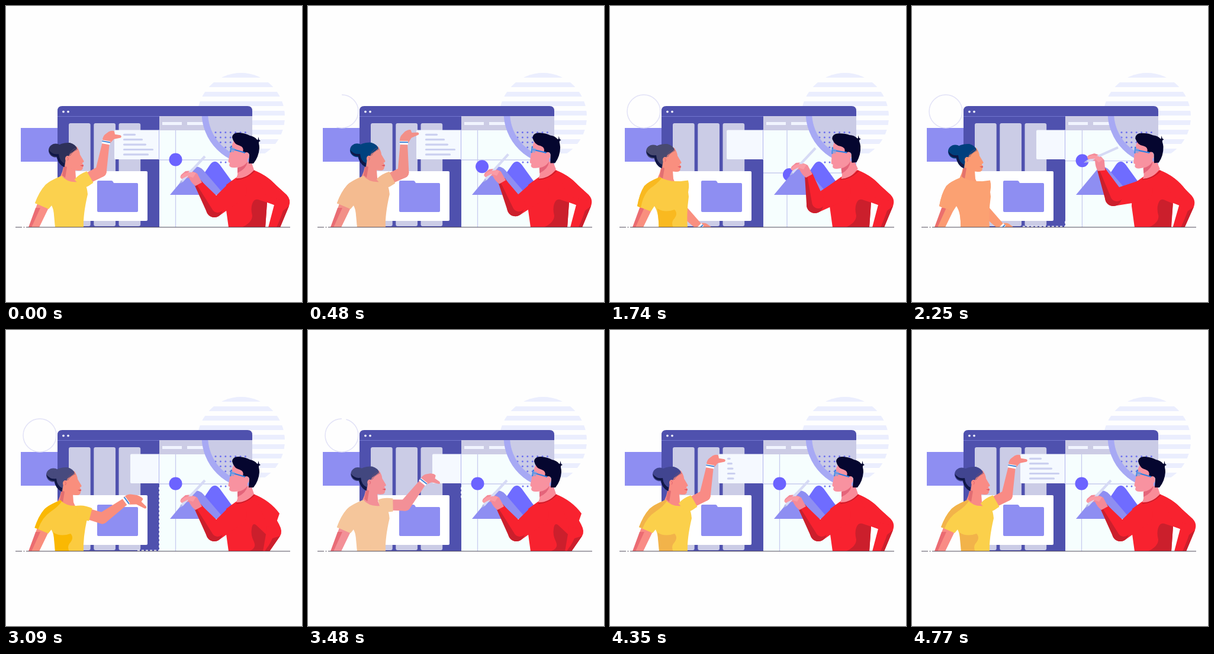
These frames come from a looping animation (500 px wide and 500 px high, 4.92 s). An HTML page:

```html
<!DOCTYPE html>
<html lang="en">
<head>
<meta charset="utf-8">
<title>Interface workshop</title>
<style>
html, body { margin: 0; width: 100%; height: 100%; overflow: hidden; background: #fefefe; }
svg { display: block; width: 100vw; height: 100vh; }
</style>
</head>
<body>
<svg viewBox="0 0 500 500">
  <defs>
    <clipPath id="disc"><circle cx="397" cy="187" r="74"/></clipPath>
    <clipPath id="page"><rect x="259" y="186" width="157" height="188"/></clipPath>
    <clipPath id="floor"><rect width="500" height="374"/></clipPath>
    <g id="arm">
      <path id="upper"/><path id="fore"/>
      <path id="hand" d="M-5 -4 Q-2 -11 3 -13 L11 -15 Q18 -15 20 -12 L19 -7 L27 -2 Q29 1 26 2 L14 0 L6 4 Q0 6 -5 -4Z"/>
      <path id="sleeve"/>
      <g id="band"><path d="M0 -7 V7" stroke="#fff" stroke-width="6"/><path d="M1 -7 V7" stroke="#3d86d8" stroke-width="2"/></g>
    </g>
  </defs>

  <g id="stripes" clip-path="url(#disc)" fill="#ebeefe"></g>
  <path fill="#8e8ef2" d="M25 206H100V263H25Z"/>
  <circle id="hoop" cx="57" cy="178" r="28" pathLength="100" transform="rotate(-90 57 178)" fill="none" stroke="#e2e2f7" stroke-width="1.5"/>

  <path fill="#4f51ae" d="M87 374V177Q87 169 95 169H408Q416 169 416 177V374Z"/>
  <path stroke="#7275cf" d="M87 186.5H416"/>
  <circle cx="97" cy="178.600" r="1.900" fill="#f4f5ff"/><circle cx="105" cy="178.600" r="1.900" fill="#f4f5ff"/>
  <g id="columns" fill="#cbcce6"></g>
  <rect x="97" y="279" width="142" height="84" rx="2" fill="#fff"/>
  <path fill="#8e8ef2" d="M154 297Q154 295 156 295H178Q180 295 181 297L182 299H221Q223 299 223 301V346Q223 348 221 348H156Q154 348 154 346Z"/>
  <path id="card" fill="#f5f9ff"/>
  <g id="lines" stroke="#cbd0f0" stroke-width="3.200" stroke-linecap="round"></g>

  <g clip-path="url(#page)">
    <path fill="#f6fefe" d="M259 186H416V374H259Z"/>
    <path fill="#cccce5" d="M259 186H416V210H259Z"/>
    <path fill="#f1f4fe" d="M264 196H297V201H264ZM306 196H339V201H306Z"/>
    <path id="guides" stroke="#c8cbee" stroke-width="1.300"/>
    <circle cx="419" cy="180" r="83" fill="#cacbe6"/>
    <g id="dots" fill="#6f73ef"></g>
    <circle cx="419" cy="180" r="83.200" fill="none" stroke="#a7a9f4" stroke-width="10.500"/>
    <circle id="ball" r="11" fill="#6c63ff"/>
    <path fill="#6f6cff" d="M310 319L344 269Q352 257 361 268L398 319Z"/>
    <path fill="#8e8ef2" d="M277 319L312 277Q322 266 333 277L369 319Z"/>
  </g>
  <path stroke="#b0b2ee" d="M258.500 209V260"/>
  <path id="march" fill="none" stroke="#f5f6ff" stroke-width="1.800" stroke-dasharray="4 3"/>

  <g clip-path="url(#floor)">
    <path id="rest" d="M53 334L38 374H56L72 341Z"/>
    <path fill="#e5606c" opacity=".75" d="M50 341L38 374H43L58 341Z"/>
    <use id="armBack" href="#arm"/>
    <g id="lady">
      <path class="skin" d="M99 264L95 280L90 292L106 303H124L118 290L117 276Z"/>
      <path fill="#d9616b" opacity=".7" d="M98 270L95 286L100 290L103 272Z"/>
      <path class="skin" d="M105 242Q112 233 120 238Q125 246 125 251L131.500 262Q132 264 128.500 265L131 269Q132 270 130 272Q130 278 124 278Q113 279 104 270L97 262Z"/>
      <path fill="#d84b5d" d="M125 269.500L131 268.500L130 271Z"/>
      <ellipse class="hair" cx="84" cy="244" rx="12" ry="11.500"/>
      <path class="hair" d="M84 238Q94 230 108 231Q118 234 120 241L108 250Q106 256 101 258L99 272Q90 270 85 254Z"/>
      <path fill="#101747" d="M72 243Q75 255 86 254Q87 266 98 272L99 266Q90 262 89 250Q79 252 72 243Z"/>
      <path fill="none" stroke="#71506c" stroke-width=".8" d="M118 240Q109 244 106 253M121 242Q112 246 108 253"/>
      <ellipse class="skin" cx="104" cy="258" rx="4" ry="5"/>
      <path fill="none" stroke="#e2606e" d="M103 255Q107 257 104 261"/>
    </g>
    <path id="torso"/>
    <path class="shade" d="M80 342Q92 350 109 344Q116 351 107 361Q103 367 107 374H83Z"/>
    <path class="shade" id="strap"/>
  </g>
  <use id="armFront" href="#arm"/>

  <g clip-path="url(#floor)">
    <path id="elbow" fill="#f8222f"/>
    <path id="cuff" fill="#cb1f2c"/>
    <path fill="#f8222f" d="M390 289Q380 296 372 302L371 338L376 374H438L441 331L453 336L462 310Q446 288 418 277Z"/>
    <path id="fold" fill="#cb1f2c"/>
    <path id="topArm" fill="#f8222f"/>
    <g id="manHead">
      <path fill="#f98c99" d="M392 268L391 285L389 291Q406 292 419 277L414 262Z"/>
      <path fill="#e4647a" d="M391 273Q402 272 408 263Q406 275 391 282Z"/>
      <path fill="#f892a0" d="M385 227L380 239L375.500 262Q375 264 378 265L377 269Q378 273 384 273Q398 274 408 263L408 234Z"/>
      <path fill="#05062f" d="M382 222Q383 213 394 214Q405 215 412 219Q428 222 428 240Q427 255 418 266L410 266L411 251Q409 245 404 249L400 247Q403 239 395 236Q385 234 382 222Z"/>
      <path fill="#05062f" d="M422 227L425.500 226L426.500 221L427.500 226L430 228L427.500 229L426 234Z"/>
      <ellipse cx="406" cy="253" rx="4.500" ry="6" fill="#f892a0"/>
      <path fill="none" stroke="#2e7fe2" stroke-width="2.300" d="M381 236L379 247M380 241L404 248"/>
      <path fill="#79a5e8" opacity=".65" d="M380 238L387 240L385 247L379 246Z"/>
    </g>
    <path fill="none" stroke="#c91d2b" stroke-width="1.500" d="M389 293Q407 292 420 278"/>
    <path id="manUpper" fill="#f8222f"/>
    <path id="manFore" fill="#cb1f2c"/>
    <path id="manLight" fill="#f8222f"/>
    <g id="grip">
      <path fill="#f48a98" d="M6 -2L-2 -17Q-12 -23 -22 -21L-29 -15Q-32 -11 -28 -8L-16 -10Q-12 -1 -5 4Z"/>
      <path stroke="#d6daf5" stroke-width="4.200" d="M11 -46L-28 -4"/>
      <path fill="#b3b8e8" d="M-29.500 -5.500L-32.500 0.500L-26.500 -2.500Z"/>
      <path fill="#fa9ba5" d="M-4 -18Q-14 -21 -24 -17L-31 -11L-28 -8L-18 -13L-9 -10Z"/>
    </g>
  </g>
  <path stroke="#55505f" d="M16 373.700H27M29.500 373.700H31.500M34 373.700H480"/>
</svg>
<script>
const LOOP = 4920, STEP = 30, LAST = 4770;
const $ = id => document.getElementById(id);
const set = (id, name, value) => $(id).setAttribute(name, value);
const path = (id, d) => set(id, "d", d);
const lerp = (a, b, k) => a + (b - a) * k;

// Rows are [time, value, value, ...], eased between neighbours.
function key(t, rows) {
  if (t <= rows[0][0]) return rows[0].slice(1);
  for (let i = 1; i < rows.length; i++) {
    const a = rows[i - 1], b = rows[i];
    if (t < b[0]) {
      const u = (t - a[0]) / (b[0] - a[0]), k = u * u * (3 - 2 * u);
      return a.slice(1).map((v, j) => lerp(v, b[j + 1], k));
    }
  }
  return rows[rows.length - 1].slice(1);
}

// Blends two paths that share one structure.
function morph(p, q, k) {
  const to = q.match(/-?[\d.]+/g);
  let i = 0;
  return p.replace(/-?[\d.]+/g, n => lerp(+n, +to[i++], k).toFixed(2));
}

// Tapered limb with round ends.
function limb([ax, ay], [bx, by], ra, rb) {
  const len = Math.hypot(bx - ax, by - ay), nx = (by - ay) / len, ny = (ax - bx) / len;
  return `M${ax + nx * ra} ${ay + ny * ra}L${bx + nx * rb} ${by + ny * rb}` +
    `A${rb} ${rb} 0 0 1 ${bx - nx * rb} ${by - ny * rb}` +
    `L${ax - nx * ra} ${ay - ny * ra}A${ra} ${ra} 0 0 1 ${ax + nx * ra} ${ay + ny * ra}Z`;
}

function polar([x, y], len, deg) {
  const a = deg * Math.PI / 180;
  return [x + len * Math.cos(a), y + len * Math.sin(a)];
}

let html = "";
for (let y = 113; y < 250; y += 16) html += `<rect x="320" y="${y}" width="154" height="8"/>`;
$("stripes").innerHTML = html;

$("columns").innerHTML = [106, 148.3, 190.5].map(x =>
  `<rect x="${x}" y="198" width="36.700" height="174" rx="3"/>`).join("");

html = "";
for (let r = 0; r < 5; r++)
  for (let c = 0; c < 7; c++) {
    const x = 354 + c * 8.4, y = 213.5 + r * 8.4;
    if (Math.hypot(x - 419, y - 180) < 79) html += `<circle cx="${x}" cy="${y}" r="1.500"/>`;
  }
$("dots").innerHTML = html + '<circle cx="363" cy="264" r="1.500"/><circle cx="371" cy="264" r="1.500"/>';

const widths = [21, 33, 39, 51, 43];
$("lines").innerHTML = widths.map(() => "<path/>").join("");

// Colour sets: [until, shirt, shade, hair, skin]
const looks = [
  [480, "#fbd14e", "#fbd14e", "#2e3159", "#f98f86"],
  [1335, "#f4bb90", "#f4bb90", "#00427f", "#f29088"],
  [1995, "#fbcb43", "#f9b920", "#484a70", "#f98f7f"],
  [2670, "#fba172", "#fba172", "#00407e", "#fb9a72"],
  [3480, "#fbcb40", "#fab803", "#474a7e", "#f98e7d"],
  [4320, "#f5c69b", "#f5c69b", "#42477f", "#f39097"],
  [LOOP, "#fbd04b", "#f2b34a", "#414590", "#f98b85"]
];

const torso = [
  "M94 287Q72 296 66 303Q56 314 49 333L72 343L77 337Q83 348 83 374L131 374Q130 352 138 318Q137 306 133 300L122 297Q104 299 94 287Z",
  "M84 289Q64 297 58 304Q50 316 46 338L69 347L75 338Q83 350 82 374L131 374Q129 352 133 322Q132 306 124 299L117 296Q98 297 84 289Z"
];
const strap = [
  "M94 287Q72 296 66 303Q56 314 49 333L55 335Q62 316 78 306Q90 298 96 289Z",
  "M84 289Q64 297 58 304Q50 316 46 338L52 341Q56 318 68 308Q80 300 87 291Z"
];
const elbow = [
  "M419 278Q440 286 452 299L474 319Q482 327 478 338L463 374L443 374L453 336L430 328Z",
  "M419 278Q438 286 444 297L461 328Q468 340 463 348L445 374L425 374L440 342L425 330Z"
];
const cuff = [
  "M478 338L463 374L457 374Q464 358 468 346Z",
  "M463 348L445 374L436 374Q445 364 450 352Z"
];
const fold = [
  "M416 334Q419 325 426 327L441 332L438 374L398 374Q416 366 416 354Q413 342 416 334Z",
  "M415 336Q416 325 422 329L439 345L434 374L408 374Q424 370 419 358Q413 346 415 336Z"
];

function paintLady(t) {
  const [, shirt, shade, hair, skin] = looks.find(l => t < l[0]);
  const fill = (sel, c) => document.querySelectorAll(sel).forEach(e => e.setAttribute("fill", c));
  fill(".skin, #rest, #upper, #fore, #hand", skin);
  fill(".hair", hair);
  fill("#torso, #sleeve", shirt);
  fill(".shade", shade);

  const [hx, hy] = key(t, [[250, 0, 0], [930, -4, -1], [1620, -11, 2], [2650, -11, 2],
    [3090, -4, 1], [3700, 2, -1], [4400, 0, 0]]);
  set("lady", "transform", `translate(${hx} ${hy})`);
  const [lean] = key(t, [[300, 0], [930, .15], [1620, 1], [2650, 1], [3090, .2], [3700, 0]]);
  path("torso", morph(...torso, lean));
  path("strap", morph(...strap, lean));

  // shoulder x, y, upper angle, forearm angle, hand angle, hand stretch
  const [sx, sy, ua, fa, ha, hs] = key(t, [
    [250, 130, 295, -27, -80, -22, 1],
    [930, 130, 296, -18, -113, -64, 1.3],
    [1040, 130, 297, -14, -108, -60, 1.3],
    [1600, 122, 305, 100, 45, 50, 1],
    [2690, 122, 305, 100, 45, 50, 1],
    [2780, 125, 306, 85, 72, 75, 1],
    [3090, 130, 308, 17, -36, 19, 1.3],
    [3180, 130, 307, 16, -37, 18, 1.3],
    [3550, 130, 294, 0, -54, 2, 1],
    [3870, 130, 293, -11, -73, -10, 1],
    [4280, 130, 295, -27, -80, -22, 1]
  ]);
  const s = [sx, sy], e = polar(s, 34, ua), w = polar(e, 50, fa);
  path("upper", limb(s, e, 9, 9.5));
  path("fore", limb(e, w, 9.5, 6));
  path("sleeve", "M-12 -8Q-2 -13 13 -11L14 11Q4 13 -6 12Z");
  set("sleeve", "transform", `translate(${s}) rotate(${ua})`);
  set("hand", "transform", `translate(${w}) rotate(${ha}) scale(${hs} 1)`);
  set("band", "transform", `translate(${w}) rotate(${fa})`);
  const behind = t >= 1380 && t < 2730;
  set("armBack", "visibility", behind ? "visible" : "hidden");
  set("armFront", "visibility", behind ? "hidden" : "visible");
}

function paintMan(t) {
  const [ex, ey, wx, wy, turn] = key(t, [
    [200, 352, 343, 325, 300, 0],
    [900, 347, 338, 334, 290, -3],
    [1720, 346, 336, 336, 286, 0],
    [2250, 340, 324, 320, 277, 23],
    [2450, 340, 324, 320, 277, 23],
    [3000, 352, 343, 325, 300, 0]
  ]);
  const e = [ex, ey], w = [wx, wy];
  path("manUpper", limb([389, 312], e, 18, 14));
  path("manFore", limb(e, w, 14, 7));
  path("manLight", limb([ex + 6, ey - 5], [wx + 2, wy], 11, 5));
  set("grip", "transform", `translate(${w}) rotate(${turn})`);

  const [nod] = key(t, [[200, 0], [850, -7], [1800, -7], [2250, -5], [2450, -5], [3000, 0]]);
  set("manHead", "transform", `rotate(${nod} 400 278)`);

  const [shut] = key(t, [[2130, 0], [2250, .14], [2720, 1], [3800, 1], [4300, 0]]);
  path("elbow", morph(...elbow, shut));
  path("cuff", morph(...cuff, shut));
  path("fold", morph(...fold, shut));
  path("topArm", morph("M419 278Q440 286 452 299L474 319Q478 324 476 330L440 322Z",
    "M419 278Q438 286 444 297L461 328Q464 334 463 340L440 326Z", shut));
}

function paintScreen(t) {
  const [drawn] = key(t, [[0, 0], [900, 100]]), [gone] = key(t, [[3360, 0], [4320, 100]]);
  const left = drawn - gone;
  set("hoop", "visibility", left > .1 ? "visible" : "hidden");
  set("hoop", "stroke-dasharray", left > 99.9 ? "none" : `${left} 200`);
  set("hoop", "stroke-dashoffset", -gone);

  const [x] = key(t, [[1200, 183], [2250, 210], [3530, 210], [4250, 183]]);
  path("card", `M259 209.500H${x + 2}Q${x} 209.500 ${x} 211.500V257Q${x} 259 ${x + 2} 259H259Z`);
  const [full] = key(t, [[560, 1], [1260, 0], [4180, 0], [4680, 1]]);
  [...$("lines").children].forEach((line, i) => {
    const y = 217.3 + i * 8.4;
    line.setAttribute("d", full > .02 ? `M199.500 ${y}h${Math.max(0, widths[i] * full - 3)}` : "");
  });

  const [bx, by] = key(t, [[150, 286.5, 259.5], [850, 303, 285], [1720, 303, 285], [2350, 286.5, 259.5]]);
  set("ball", "cx", bx);
  set("ball", "cy", by);
  const [gx, gy] = key(t, [[1000, 286.5, 260], [1650, 299, 282], [1760, 299, 282], [2350, 286.5, 260]]);
  path("guides", `M${gx} 210V374M259 ${gy}H416`);

  const [from] = key(t, [[2400, 0], [3090, 32], [3600, 182]]);
  const [to] = key(t, [[1950, 0], [2250, 84], [3090, 182]]);
  const at = d => d < 72 ? `${187 + d} 372.500` : `259 ${372.5 - (d - 72)}`;
  const corner = from < 72 && to > 72 ? "L259 372.500" : "";
  path("march", to - from > .5 ? `M${at(from)}${corner}L${at(to)}` : "");
  set("march", "stroke-dashoffset", from);
}

function draw(now) {
  const t = Math.min(LAST, Math.floor(now % LOOP / STEP) * STEP);
  paintScreen(t);
  paintLady(t);
  paintMan(t);
}

let start = null;
function tick(now) {
  if (start === null) start = now;
  draw(now - start);
  requestAnimationFrame(tick);
}
draw(0);
requestAnimationFrame(tick);
</script>
</body>
</html>
```
